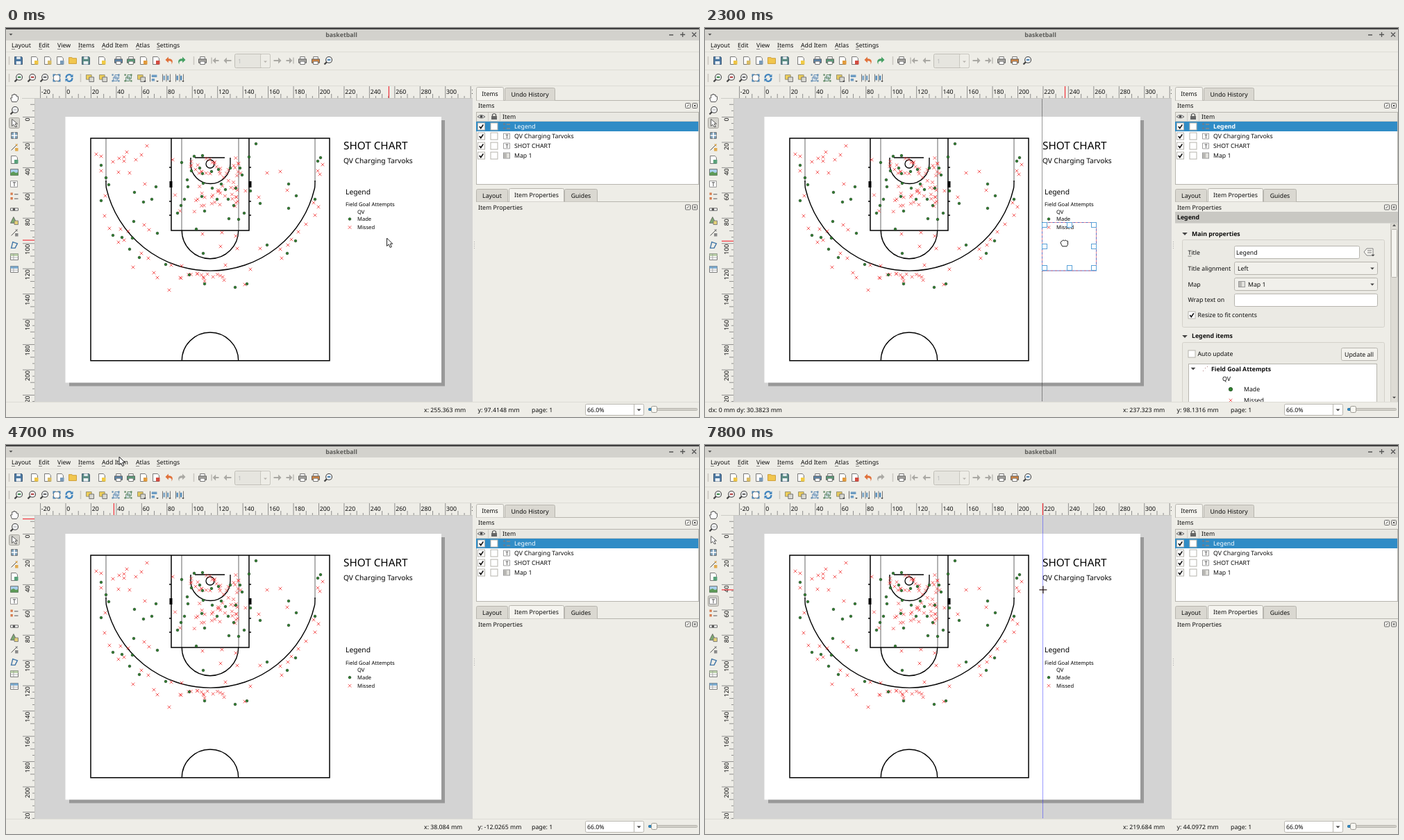
Recreate the animation shown at these times as an HTML page. Size 998 by 561 pixels, loop 8 s.

```html
<!DOCTYPE html>
<html lang="en">
<head>
<meta charset="utf-8">
<title>Layout editor</title>
<style>
html, body { margin: 0; width: 100%; height: 100%; overflow: hidden; background: #eeede7; }
svg { display: block; width: 998px; height: 561px; }
text { font-family: "Noto Sans", sans-serif; text-rendering: geometricPrecision; white-space: pre; }
.shadow { filter: drop-shadow(0 2px 5px rgba(0, 0, 0, .6)); }
</style>
</head>
<body>
<script>
const BG = '#eeede7', BLUE = '#308cc6', BLUE_EDGE = '#2670a0', EDGE = '#b7b5ae', INK = '#0c0c0c', UI = 8.75;
const MM = 1.8225, LEFT = 86, TOP = 128.5, LOOP = 8000;
const TEAM = 'QV Charging Tarvoks', SHORT = 'QV';
const toX = mm => LEFT + mm * MM, toY = mm => TOP + mm * MM;

function el(tag, attrs, parent) {
  const node = document.createElementNS('http://www.w3.org/2000/svg', tag);
  for (const key in attrs) node.setAttribute(key, attrs[key]);
  parent.append(node);
  return node;
}
const svg = el('svg', { viewBox: '0 0 998 561' }, document.body);
let layer = svg;
const group = (parent = svg) => layer = el('g', {}, parent);
const rect = (x, y, w, h, fill, stroke, rx = 0) =>
  el('rect', { x, y, width: w, height: h, fill, stroke: stroke || 'none', rx }, layer);
const path = (d, stroke, width = 1, fill = 'none') =>
  el('path', { d, stroke, 'stroke-width': width, fill }, layer);
// y is the middle of the capitals
function text(x, y, string, size = UI, more = {}) {
  const node = el('text', { x, y: y + size * 0.357, 'font-size': size, fill: INK, ...more }, layer);
  node.textContent = string;
  return node;
}
const bold = { 'font-weight': 700 };
const show = (node, on) => node.setAttribute('visibility', on ? 'visible' : 'hidden');

const glyphs = {
  disk: c => [['M-5-5H4L5-4V5H-5Z', c, '#3c5570'], ['M-2.500-5H2.500V-2H-2.500ZM-3 1H3V5H-3Z', '#eef2f5']],
  page: c => [['M-4-5H2L4-3V5H-4Z', '#fff', '#666'], ['M0 0H5V5H0Z', c]],
  folder: c => [['M-5-4H-1L0-3H5V4H-5Z', c, '#c9982f']],
  print: c => [['M-5-2H5V3H-5Z', c, '#555'], ['M-3-5H3V-2H-3ZM-3 1H3V5H-3Z', '#fff', '#666']],
  undo: c => [['M-5-1L-1-5V-2.5C4-3 6 1 3 5C4 1 2 0-1 .5V3Z', c]],
  redo: c => [['M5-1L1-5V-2.5C-4-3-6 1-3 5C-4 1-2 0 1 .5V3Z', c]],
  back: c => [['M-5 0L-1-4V-1H5V1H-1V4Z', c]],
  next: c => [['M5 0L1-4V-1H-5V1H1V4Z', c]],
  first: c => [['M-5-4H-4V4H-5ZM-3 0L1-4V-1H5V1H1V4Z', c]],
  last: c => [['M5-4H4V4H5ZM3 0L-1-4V-1H-5V1H-1V4Z', c]],
  zoom: c => [['M-1.500 1.500L-5 5', 'none', '#444', 2], ['M5-1A4 4 0 1 1-3-1A4 4 0 1 1 5-1Z', '#f4f6f8', '#444', 1], ['M-1-2H3V0H-1Z', c]],
  reload: c => [['M-4 0A4 4 0 0 1 3-3M4 0A4 4 0 0 1-3 3', 'none', c, 2], ['M5-5V-1H1ZM-5 5V1H-1Z', c]],
  full: c => [['M-4-4H4V4H-4Z', '#fff', '#666'], ['M-5-5H-1L-5-1ZM5-5V-1L1-5ZM-5 5V1L-1 5ZM5 5H1L5 1Z', c]],
  stack: c => [['M-5-4H2V2H-5Z', c, '#8d8a70'], ['M-1-1H5V5H-1Z', '#d8d8d2', '#666']],
  group: c => [['M-3-1H2V4H-3ZM-1-4H4V1H-1Z', '#dce6ee', c], ['M-5-5H-3V-3H-5ZM3-5H5V-3H3ZM-5 3H-3V5H-5ZM3 3H5V5H3Z', c]],
  align: c => [['M-5-5V5', 'none', '#555'], ['M-3-4H4V-1H-3ZM-3 1H1V4H-3Z', c]],
  spread: c => [['M-5-5V5M0-5V5M5-5V5', 'none', '#666'], ['M-4-3H-2V3H-4ZM1-3H3V3H1Z', c]],
  hand: () => [['M-3 5L-5 0L-3 0V-4H-1V-5H1V-4H3V-2H5V2L3 5Z', '#fff', '#444']],
  arrow: () => [['M-3-5L4 1L1 1L3 5L1 5L-1 2L-3 4Z', '#fff', '#444']],
  move: c => [['M-4-4H4V4H-4Z', c, '#666'], ['M0-4V4M-4 0H4', 'none', '#fff', 1.5]],
  image: c => [['M-5-4H5V4H-5Z', '#a9d0ec', '#666'], ['M-5 4V1L-1-1L2 1L5 0V4Z', c]],
  label: () => [['M-5-4H4V4H-5Z', '#fff', '#888'], ['M-2-2H2M0-2V3', 'none', '#444']],
  legend: c => [['M-5-5H-2V-2H-5ZM-5 1H-2V4H-5Z', c], ['M0-3H5M0 3H5', 'none', '#888', 1.3]],
  scale: () => [['M-5-1H5V2H-5Z', '#fff', '#555'], ['M-2-1H1V2H-2Z', '#555']],
  shape: c => [['M-5 3L-1-5L3 3Z', c, '#666'], ['M0 0H5V5H0Z', '#e4d078', '#777']],
  line: c => [['M-4 4L4-4', 'none', '#444'], ['M4-4V-1L1-4ZM1 1H5V5H1Z', c]],
  node: c => [['M-4 4L-2-4L4-2L1 4Z', 'none', c, 1.3]],
  table: c => [['M-5-4H5V4H-5Z', '#fff', '#666'], ['M-5-4H5V-1H-5Z', c], ['M-5 1H5M-1-4V4', 'none', '#999', .7]]
};
function icon(x, y, kind, color, size = 1.1) {
  const g = el('g', { transform: `translate(${x} ${y}) scale(${size})` }, layer);
  for (const [d, fill, stroke = 'none', width = .8] of glyphs[kind](color))
    el('path', { d, fill, stroke, 'stroke-width': width }, g);
  return g;
}
function checkbox(x, y, on) {
  rect(x - 5, y - 5, 10, 10, '#fff', '#b5b3ac');
  if (on) path(`M${x - 2.7} ${y}l2 2.6l3.5-5.2`, '#111', 1.7);
}
const down = (x, y, s = 3) => path(`M${x - s} ${y - s / 2}h${2 * s}l${-s} ${s}z`, 'none', 0, '#444');

// ---- window frame, menu bar and toolbars
rect(0, 0, 998, 561, BG);
rect(0, 0, 998, 18, '#d3d2cd');
rect(0, 0, 998, 2, '#3f3f3f');
down(7, 9.5, 2.5);
text(483, 9.5, 'basketball', UI, { ...bold, fill: '#5b5b58', 'text-anchor': 'middle' });
path('M955 10h6M971 9.500h7M974.500 6v7M988 6.500l6 6m0-6l-6 6', '#555', 1.3);

const menuMark = rect(136.5, 18.5, 43, 14.5, BLUE, BLUE_EDGE);
const menuNames = [['Layout', 8], ['Edit', 47], ['View', 74], ['Items', 104], ['Add Item', 138], ['Atlas', 187], ['Settings', 217]]
  .map(([name, x]) => {
    path(`M${x} 30.500h5`, '#555', .7);
    return text(x, 25, name);
  });
path('M0 34.500H998M0 60.500H998M0 83.500H998', '#dddcd5');
path('M4.500 41v12M4.500 66v12M107.500 66v12M270.500 41v12', '#c9c7c0', 1.5);

const GRAY = '#aaa9a4';
[[18, 'disk', '#4b78a2'], [41, 'page', '#efc544'], [60, 'page', '#d9bc66'], [78, 'page', '#7a9bb8'], [96, 'folder', '#f1c64e'],
 [115, 'disk', '#5c8d84'], [138, 'page', '#f1cb45'], [162, 'print', '#5b87ad'], [180, 'print', '#5aa17a'], [198, 'page', '#e29b3c'],
 [216, 'page', '#d34b40'], [235, 'undo', '#e0713a'], [283, 'print', GRAY], [301, 'first', GRAY], [319, 'back', GRAY],
 [391, 'next', GRAY], [409, 'last', GRAY], [427, 'print', GRAY], [446, 'print', '#d58742'], [464, 'zoom', '#4b83b2']]
  .forEach(([x, kind, c]) => icon(x, 47, kind, c));
const redoOn = icon(253, 47, 'redo', '#45a063'), redoOff = icon(253, 47, 'redo', GRAY);
rect(329.5, 37.5, 51, 20, '#e6e5df', '#c0beb7', 2);
rect(366.5, 37.5, 14, 20, BG, '#c8c6bf', 2);
text(334, 47.5, '1', UI, { fill: '#bbb' });
path('M371 47.500h5l-2.500 2.500z', 'none', 0, '#b5b3ad');

[[18, 'zoom', '#3f8a4a'], [37, 'zoom', '#b74a4a'], [55, 'zoom', '#666'], [73, 'full', '#4b83b2'], [91, 'reload', '#3f83bd'],
 [121, 'stack', '#efcf58'], [140, 'stack', '#efcf58'], [158, 'group', '#5b87ad'], [176, 'group', '#55815b'],
 [195, 'stack', '#e5c95e'], [213, 'align', '#6c9bc2'], [231, 'spread', '#6c9bc2'], [250, 'spread', '#4a86b8']]
  .forEach(([x, kind, c]) => icon(x, 72, kind, c));
[200, 218, 236, 255].forEach(x => down(x, 77, 1.8));

const toolMark = rect(4.5, 0, 15, 15, '#d3d2cc', '#a9a7a0', 2);
const toolRows = [101, 119, 137, 155, 172, 190, 208, 225, 243, 261, 278, 295, 313, 330, 348];
[['hand'], ['zoom', '#ccc'], ['arrow'], ['move', '#7ea2bc'], ['line', '#e0a94c'], ['page', '#5aa17a'], ['image', '#5d9a57'],
 ['label'], ['legend', '#d57b4d'], ['scale'], ['shape', '#7cab71'], ['line', '#888'], ['node', '#4478a8'], ['table', '#b9cfa8'], ['table', '#79aad0']]
  .forEach(([kind, c], i) => icon(12, toolRows[i], kind, c));

// ---- layout canvas
rect(41, 101, 631, 438, '#d3d3d3');
rect(91, 133, 541, 383.5, '#999');
rect(85.5, 128, 541.5, 383.5, '#fff');

path('M144 159V222M445 159V222M253 159V292M335 159V292', '#555', .9);
path('M122 159H466V479.700H122ZM238 159V292H350V159', '#000', 1.5);
path('M144 220C144 226 144 229 144.500 231A154 154 0 0 0 444.500 231C445 229 445 226 445 220', '#000', 1.4);
path('M253.300 292A40.700 40.700 0 0 0 334.700 292M253.300 479.700A40.700 40.700 0 0 1 334.700 479.700', '#000', 1.4);
path('M266 187V196A28.500 28.500 0 0 0 323 196V187M272 187H315', '#000', 1.4);
path('M300 196A6 6 0 1 1 288 196A6 6 0 1 1 300 196', '#000', 1.3);
path('M235 201h3M235 250h3M235 270h3M350 201h3M350 250h3M350 270h3', '#000', 1.3);
path('M237.500 221v9M351.500 221v9', '#000', 4);

const cross = (x, y) => path(`M${x - 2.3} ${y - 2.3}l4.600 4.600m0-4.600l-4.600 4.600`, '#f23a3a', .8);
const dot = (x, y, r = 1.8) => el('circle', { cx: x, cy: y, r, fill: '#2f832f', stroke: '#173d17', 'stroke-width': .7 }, layer);
function pairs(list, draw) {
  for (let i = 0; i < list.length; i += 2) draw(list[i], list[i + 1]);
}
let seed = 11;
const random = () => (seed = seed * 16807 % 2147483647) / 2147483647;
function scatter(x, y, w, h, count) {
  while (count--) cross(x + w * random(), y + h * random());
}
pairs([130, 182, 137, 185, 137, 206, 154, 193, 163, 188, 170, 186, 174, 179, 170, 192, 187, 190, 195, 183, 203, 170, 200, 225, 162, 208, 178, 209,
  143, 242, 142, 271, 149, 289, 165, 290, 176, 293, 162, 309, 170, 306, 199, 284, 206, 291, 205, 332, 195, 325, 183, 345, 213, 353, 218, 360,
  238, 342, 253, 343, 235, 378, 376, 209, 395, 207, 456, 197, 449, 206, 452, 211, 364, 244, 405, 234, 443, 252, 450, 258, 445, 270, 432, 283,
  421, 294, 411, 305, 406, 313, 395, 319, 397, 332, 366, 318, 352, 348, 344, 370, 283, 297, 311, 295, 331, 300, 333, 318, 309, 315, 316, 342], cross);
scatter(266, 187, 72, 28, 26);
scatter(276, 227, 58, 30, 26);
scatter(240, 188, 106, 95, 14);
scatter(242, 352, 86, 14, 16);
pairs([360, 167, 137, 198, 144, 216, 148, 226, 137, 249, 185, 237, 216, 229, 210, 247, 198, 251, 184, 279, 154, 299, 167, 302, 182, 303, 218, 296,
  178, 319, 192, 331, 230, 341, 453, 187, 449, 192, 407, 225, 418, 242, 407, 260, 445, 247, 352, 235, 366, 253, 417, 307, 405, 325, 376, 313,
  347, 369, 330, 374, 286, 369, 264, 356, 284, 325, 274, 290, 350, 186, 253, 194, 271, 185, 283, 184, 267, 206, 261, 219, 262, 229, 279, 202,
  283, 210, 296, 207, 306, 204, 323, 202, 337, 202, 340, 212, 284, 224, 297, 231, 310, 225, 316, 233, 331, 231, 320, 247, 328, 256, 343, 267,
  257, 247, 252, 256, 247, 267, 286, 264, 282, 243, 304, 247, 321, 275, 335, 276], dot);

const print = { fill: '#000' };
text(486, 169.5, 'SHOT CHART', 15.3, print);
text(486, 191, TEAM, 10.2, print);
const legend = group();
text(489, 236, 'Legend', 10.3, print);
text(489, 254.5, 'Field Goal Attempts', 7.7, print);
text(506, 265, SHORT, 7.6, print);
dot(495, 275.5);
text(506, 275.5, 'Made', 7.6, print);
cross(495, 287.5);
text(506, 287.5, 'Missed', 7.6, print);

group();
const snap = path('M485.500 101V539', '#333', 1);
snap.setAttribute('stroke-dasharray', '1 1');
snap.setAttribute('shape-rendering', 'crispEdges');
const frame = group();
rect(485.5, 225.5, 78, 69.5, 'none', '#5b6fc4');
rect(485.5, 225.5, 78, 69.5, 'none', '#e98a96').setAttribute('stroke-dasharray', '3 3');
for (const x of [485, 521, 556]) for (const y of [225, 256, 287])
  if (x !== 521 || y !== 256) rect(x + .5, y + .5, 7, 7, '#fff', '#5aa2d8');

// ---- rulers
group();
rect(23, 84, 649, 17, BG);
rect(23, 84, 18, 455, BG);
path('M23 101.500H672M41.500 101V539', '#c5c4be', .8);
for (let mm = -20; mm <= 320; mm += 5) {
  const x = toX(mm), major = mm % 20 === 0, size = major ? 17 : mm % 10 ? 3 : 6;
  if (x > 41) path(`M${x} ${101 - size}V101`, '#777', .8);
  if (major) text(x + 1.3, 91.5, mm, UI);
}
for (let mm = -10; mm <= 225; mm += 5) {
  const y = toY(mm), major = mm % 20 === 0, size = major ? 17 : mm % 10 ? 3 : 6;
  if (y < 539) path(`M${41 - size} ${y}H41`, '#777', .8);
  if (major && mm >= 0)
    text(0, 0, mm, UI, { 'text-anchor': 'end', transform: `translate(31 ${y + 1}) rotate(-90)` });
}
const markX = path('M0 84V101', '#f0323c', 1.2), markY = path('M24 0H41', '#f0323c', 1.2);

// ---- side panels
group();
rect(672, 84, 326, 456, BG);
for (let y = 308; y < 318; y += 3) rect(674, y, 1, 1, '#aaa');
function tab(x, y, w, h, name, active) {
  path(`M${x} ${y + h}V${y + 2}q0-2 2-2H${x + w - 2}q2 0 2 2V${y + h}`, EDGE, 1, active ? '#f5f4ef' : '#dad8d1');
  text(x + w / 2, y + h / 2, name, UI, { 'text-anchor': 'middle' });
}
function dockTitle(y, name) {
  text(680, y, name);
  for (const x of [982, 992]) rect(x - 3.5, y - 3.5, 7, 7, '#f5f4ef', '#666', 1);
  path(`M980.500 ${y + 1.500}l3-3M990.500 ${y - 1.500}l3 3m0-3l-3 3`, '#444', 1);
}
path('M677 104.500H998M677 250.500H998', EDGE);
tab(677.5, 85.5, 39, 19, 'Items', true);
tab(718.5, 86.5, 72, 18, 'Undo History');
tab(677.5, 232.5, 45, 18, 'Layout');
tab(724.5, 231.5, 79, 19, 'Item Properties', true);
tab(804.5, 232.5, 47, 18, 'Guides');
dockTitle(112, 'Items');
dockTitle(258.5, 'Item Properties');

rect(677.5, 121.5, 320, 104, '#fff', EDGE);
rect(678, 122, 319, 12, '#e9e8e2');
path('M694.500 122v12M711.500 122v12M678 134.500H997', '#cfcdc6');
path('M679 128q5-5 11 0q-5 4-11 0z', '#666', 1, '#ddd');
el('circle', { cx: 684.5, cy: 127.7, r: 1.8, fill: '#444' }, layer);
path('M700.500 127v-2q2.500-3 5 0v2', '#555', 1.2);
rect(699, 127, 8, 5, '#666');
text(715, 128, 'Item');
rect(677, 135, 320, 14, BLUE);
const rows = ['Legend', TEAM, 'SHOT CHART', 'Map 1'].map((name, i) => {
  const y = 142 + 14 * i;
  checkbox(684.5, y, true);
  checkbox(703, y, false);
  if (i === 0) icon(721, y, 'legend', '#5a7f9c', 1);
  else if (i < 3) icon(721.5, y, 'label', '', 1);
  else mapIcon(721, y);
  return text(732, y, name, UI, i ? {} : { fill: '#fff' });
});
function mapIcon(x, y) {
  rect(x - 4.5, y - 4, 9, 8, '#e3e2dd', '#999');
  rect(x - 4, y - 3.5, 4, 7, '#b9b8b4');
}

const panel = group();
rect(677, 265, 321, 16.5, '#c9c8c3');
text(680, 273, 'Legend', UI, bold);
rect(687.5, 305.5, 291, 126, '#ebeae4', '#d3d1ca', 2);
rect(687.5, 453.5, 291, 100, '#ebeae4', '#d3d1ca', 2);
down(691, 297, 3.8);
text(701, 296.5, 'Main properties', UI, bold);
down(691, 445, 3.8);
text(701, 444, 'Legend items', UI, bold);
const field = (x, y, w, h, fill = '#fff') => rect(x + .5, y + .5, w, h, fill, EDGE, 2);
text(695.5, 324, 'Title');
path('M695.500 329h5', '#555', .7);
text(695.5, 347, 'Title alignment');
text(695.5, 370, 'Map');
text(695.5, 392, 'Wrap text on');
field(762, 314, 180, 18);
text(765, 323.5, 'Legend');
path('M949 323l4-5h9v10h-9z', '#777', .9, '#f5f4ef');
path('M954 321h6M954 324h6', '#777');
down(962, 328, 2.5);
field(762, 337, 206, 18, '#f1f0eb');
text(767, 347, 'Left');
down(961, 347, 2.8);
field(762, 360, 206, 18, '#f1f0eb');
mapIcon(773, 369.5);
text(782, 369.5, 'Map 1');
down(961, 370, 2.8);
field(762, 383, 206, 18);
checkbox(701, 414, true);
text(709.5, 414, 'Resize to fit contents');
checkbox(701, 470, false);
text(709.5, 470, 'Auto update');
field(916, 461, 52, 18, '#f3f2ed');
text(942, 470.5, 'Update all', UI, { 'text-anchor': 'middle' });
rect(696.5, 484.5, 271, 70, '#fff', EDGE);
down(703, 491.5, 3.4);
for (const [x, y] of [[717, 494], [720, 490], [723, 488]]) rect(x, y, 1, 1, '#b08080');
text(729, 491.5, 'Field Goal Attempts', UI, bold);
text(745, 506, SHORT);
dot(757, 521, 2.7);
text(776, 521, 'Made');
cross(757, 537);
text(776, 537, 'Missed');
rect(987.5, 282.5, 10, 257, '#dedcd5', '#cbc9c2');
rect(988.5, 290.5, 8, 69, '#f5f4ef', EDGE, 1);
path('M990 286l2.500-3l2.500 3z', 'none', 0, '#555');
down(992.5, 533, 2.5);

// ---- status bar
group();
rect(0, 539, 998, 22, BG);
path('M0 539.500H998', '#dddcd5');
const status = text(5, 550.5, '');
const readX = text(602, 550.5, ''), readY = text(679.5, 550.5, '');
text(757, 550.5, 'page: 1');
rect(834.5, 542.5, 84, 16, '#fff', EDGE, 2);
path('M904.500 543v15', EDGE);
text(837, 550.5, '66.0%');
down(911.5, 551, 3);
rect(925.5, 548.5, 70, 3, '#d2d0c9', EDGE, 1);
rect(925.5, 548.5, 5, 3, BLUE, BLUE_EDGE, 1);
rect(929.5, 545.5, 8, 9, '#f7f6f1', '#9c9a93', 2);

// ---- drop-down menu
const menu = group();
rect(136.5, 33.5, 150, 182, '#fbfbf9', '#b5b3ac').setAttribute('class', 'shadow');
const STEP = 18.22;
const hover = rect(137, 34, 149, STEP - .7, BLUE, BLUE_EDGE);
const menuRows = [['Map', 'page', '#f1cb45'], ['Picture', 'image', '#5d9a57'], ['Label', 'label'], ['Legend', 'legend', '#d57b4d'], ['Scale Bar', 'scale'],
  ['Shape', 'shape', '#7cab71'], ['Arrow', 'line', '#888'], ['Node Item', 'node', '#4478a8'], ['HTML', 'table', '#b9cfa8'], ['Attribute Table', 'table', '#79aad0']]
  .map(([name, kind, c], i) => {
    const y = 43 + STEP * i;
    icon(146, y, kind, c);
    if (i === 5 || i === 7) path(`M279 ${y - 3.5}l4 3.500l-4 3.500z`, 'none', 0, '#444');
    return text(155, y, 'Add ' + name);
  });

// ---- pointers
const pointers = {};
group();
pointers.arrow = path('M0 0V11.500L2.700 9L4.700 13.500L6.800 12.600L4.800 8.200H8.200Z', '#222', 1, '#fff');
pointers.grab = path('M-6.500 2.500L-5.500 .500L-4-.5L-2.500-1.500L-1-.5L.5-1.500L2-.5L4 0V5L2.500 7.500H-4L-5 5.500Z', '#222', 1, '#fff');
pointers.plus = path('M.5-5.500V5.500M-5 0H6', '#2a1c1c', 1.3);

// time, millimetres across and down, pointer, its place where it is off the reading
const moves = [
  [0, 255.363, 97.4148, 'arrow', 548.5, 303], [100, 252.071, 91.9276, 'arrow'], [200, 244.937, 81.5031, 'arrow'], [300, 239.999, 72.1742, 'arrow'],
  [400, 237.323, 67.7493, 'arrow'], [700, 237.323, 67.7493, 'grab'],
  [1400, 237.323, 70.4928, 'grab'], [1500, 237.872, 76.5292, 'grab'], [1600, 237.872, 83.1137, 'grab'], [1700, 237.323, 88.5953, 'grab'],
  [1800, 237.323, 91.8872, 'grab'], [1900, 237.323, 94.0821, 'grab'], [2000, 237.323, 95.7283, 'grab'], [2100, 237.323, 97.0342, 'grab'],
  [2200, 237.323, 98.1316, 'grab'], [2500, 237.323, 99.7778, 'grab'], [2600, 237.323, 101.424, 'grab'],
  [3300, 240.615, 114.592, 'arrow'], [3400, 245.551, 131.602, 'arrow'], [3500, 247.746, 139.508, 'arrow'],
  [4000, 188.752, 77.6418, 'arrow'], [4100, 73.5254, 6.31001, 'arrow'], [4200, 38.084, -12.0265, 'arrow', 117, 33],
  [4400, 38.084, -12.0265, 'arrow', 145, 24], [4500, 38.084, -12.0265, 'arrow', 163, 16], [4700, 38.084, -12.0265, 'arrow', 163, 17],
  [5200, 38.084, -12.0265, 'arrow', 166, 27], [5300, 38.084, -12.0265, 'arrow', 173, 42], [5400, 38.084, -12.0265, 'arrow', 176, 49],
  [5500, 38.084, -12.0265, 'arrow', 177, 58], [5600, 38.084, -12.0265, 'arrow', 179, 68], [5700, 38.084, -12.0265, 'arrow', 181, 76],
  [5800, 38.084, -12.0265, 'arrow', 181, 81], [6300, 38.084, -12.0265, 'arrow', 188, 92],
  [6400, 76.2712, -5.76143, 'plus'], [6500, 111.937, 11.7974, 'plus'], [6600, 150.346, 28.2579, 'plus'], [6700, 183.267, 38.1343, 'plus'],
  [6800, 205.214, 43.0724, 'plus'], [6900, 216.188, 44.7185, 'plus'], [7000, 219.684, 45.2672, 'plus'],
  [7200, 219.684, 45.7435, 'plus'], [7300, 219.684, 46.2922, 'plus'], [7600, 219.684, 45.7435, 'plus'], [7700, 219.684, 44.6459, 'plus'],
  [7800, 219.684, 44.0972, 'plus']
];
const GRAB_Y = 67.7493;
const reading = mm => Number(mm.toPrecision(6));
const within = (t, from, to) => t >= from && t < to;

function render(t) {
  const [, mx, my, kind, px = toX(mx), py = toY(my)] = moves.findLast(row => row[0] <= t);
  for (const name in pointers) show(pointers[name], name === kind);
  pointers[kind].setAttribute('transform', `translate(${px} ${py})`);
  markX.setAttribute('transform', `translate(${toX(mx)} 0)`);
  markY.setAttribute('transform', `translate(0 ${toY(my)})`);
  readX.textContent = `x: ${reading(mx)} mm`;
  readY.textContent = `y: ${reading(my)} mm`;

  const selected = within(t, 600, 3900), dragging = within(t, 1400, 3000), dropped = t >= 3000;
  const shift = dropped ? 59.7 : dragging ? Math.min(59.7, (my - GRAB_Y) * MM) : 0;
  legend.setAttribute('transform', `translate(0 ${dropped ? 59.7 : 0})`);
  frame.setAttribute('transform', `translate(0 ${Math.round(shift)})`);
  show(frame, selected);
  show(panel, selected);
  show(snap, dragging || t >= 7000);
  snap.setAttribute('stroke', dragging ? '#333' : '#3434ff');
  snap.setAttribute('transform', `translate(${dragging ? 0 : 1} 0)`);
  rows[0].setAttribute('font-weight', selected ? 700 : 400);
  status.textContent = dragging ? `dx: 0 mm dy: ${reading(my - GRAB_Y)} mm` : selected ? '1 item selected' : '';
  show(redoOn, !dropped);
  show(redoOff, dropped);

  const open = within(t, 4900, 6200), over = open ? Math.floor((py - 34) / STEP) : -1;
  show(menu, open);
  show(menuMark, open);
  menuNames[4].setAttribute('fill', open ? '#fff' : INK);
  show(hover, over >= 0);
  hover.setAttribute('y', 34.3 + STEP * over);
  menuRows.forEach((row, i) => row.setAttribute('fill', i === over ? '#fff' : INK));
  toolMark.setAttribute('y', toolRows[t < 6200 ? 2 : 7] - 7.5);
}

function tick() {
  render(performance.now() % LOOP);
  requestAnimationFrame(tick);
}
tick();
</script>
</body>
</html>
```
